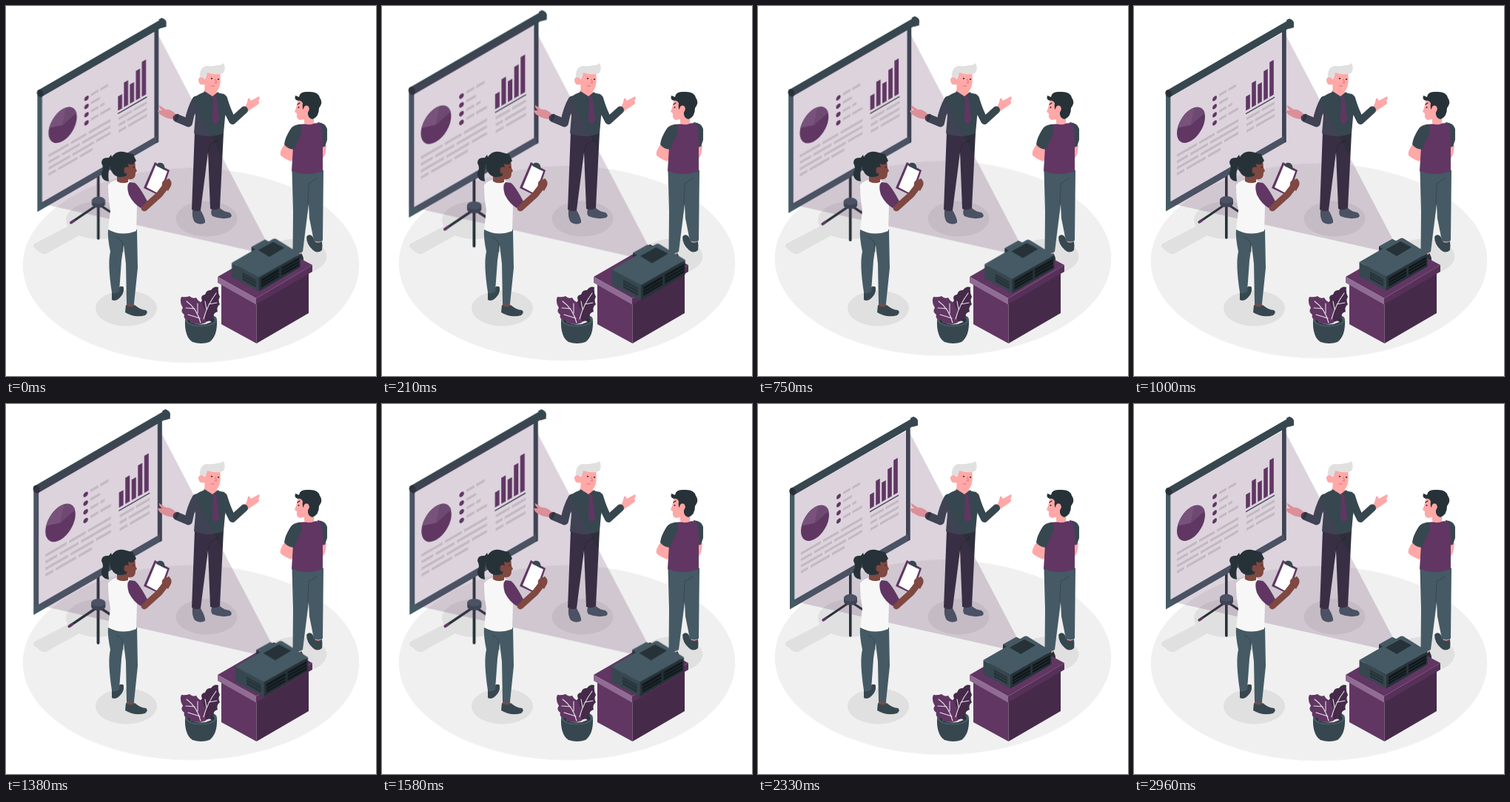
Write an HTML page that moves like this. It is 500x500 px and loops after 3040 ms.

```html
<!DOCTYPE html>
<html lang="en">
<head>
<meta charset="utf-8">
<title>Presentation</title>
<style>
html, body { margin: 0; width: 100%; height: 100%; overflow: hidden; background: #fff; }
svg { display: block; width: 100%; height: 100%; }
.beat { animation: beat 3040ms linear -20ms infinite; }
.float { animation: float 3040ms linear -20ms infinite; }
.screen { transform-origin: 129.5px 166px; }
.light { transform-origin: 225px 214px; }
@keyframes beat {
  0%, 29.6%, 39.47%, 59.21%, 100% { transform: scale(1); }
  9.87%, 49.34% { transform: scale(1.1); }
}
@keyframes float {
  0%, 49.34%, 98.68%, 100% { transform: translateY(0); }
  24.67%, 74.01% { transform: translateY(-10px); }
}
.ink { fill: #263238; }
.slate { fill: #37474f; }
.steel { fill: #455a64; }
.plum { fill: #613663; }
.night { fill: #452a49; }
.skin { fill: #ffa8a7; }
.brown { fill: #7f4841; }
.line { fill: none; stroke-linecap: round; stroke-linejoin: round; }
</style>
</head>
<body>
<svg viewBox="0 0 500 500">
  <!-- floor and shadows -->
  <ellipse class="float" cx="250" cy="350.8" rx="227.3" ry="131.7" fill="#f0f0f0"/>
  <g fill="#e0e0e0">
    <ellipse cx="124" cy="289.5" rx="43" ry="25.5"/>
    <ellipse cx="271" cy="287.5" rx="41.5" ry="24"/>
    <ellipse cx="162.5" cy="408.5" rx="41.5" ry="24"/>
    <ellipse cx="392" cy="338.5" rx="41.5" ry="24"/>
    <path d="M37 326V322L110 284L133 291L54 335Q50 336 46 333Z"/>
  </g>

  <!-- screen on its tripod -->
  <g class="beat screen">
    <path class="line" d="M125 267L88 292M125 267L160 290" stroke="#263238" stroke-width="3.2"/>
    <path class="line" d="M92 289.3L88.5 291.8" stroke="#613663" stroke-width="3.4"/>
    <path class="line" d="M124.8 226V313" stroke="#263238" stroke-width="3.6"/>
    <path class="slate" d="M116 262V267A9 5 0 0 0 134 267V262Z"/>
    <ellipse class="steel" cx="125" cy="262" rx="9" ry="5"/>
    <g transform="translate(43 118) skewY(-30)">
      <path class="steel" d="M0 0H162.5V159.5H0Z"/>
      <path class="slate" d="M157 0H162.5V159.5H160V150H157Z"/>
      <path fill="#fff" d="M6.500 0H157V150H6.500Z"/>
      <ellipse class="plum" cx="34" cy="62.5" rx="19" ry="21.5"/>
      <path d="M34 62.5L16 56A19 21.5 0 0 1 39 41.7Z" fill="#7f5a82"/>
      <path d="M34 62.5L39 41.7A19 21.5 0 0 1 52.5 57Z" fill="#725077"/>
      <path class="line" d="M66 45V79" stroke="#613663" stroke-width="6" stroke-dasharray="0 11"/>
      <g fill="none" stroke="#dedede" stroke-width="3.5">
        <path d="M72 44H82M84.5 44H95M72 55H84M72 66H82M84.5 66H90M72 77H82M84.5 77H98"/>
        <path d="M15 93H42M45 93H66M69 93H98M15 101.5H30M33 101.5H57M60 101.5H98M15 110H44M47 110H76M79 110H98M15 118H25M28 118H54M57 118H74"/>
        <path d="M109 97.5H127M129.5 97.5H147M109 106H118M120.5 106H147M109 114.5H119M122 114.5H147"/>
      </g>
      <path d="M111 86V67M119 86V53M127 86V60M135 86V46.5M143 86V39" stroke="#613663" stroke-width="5.6"/>
      <path d="M108 90H147" stroke="#37474f" stroke-width="1.5"/>
    </g>
    <path class="line" d="M47.5 118L211 23.5" stroke="#37474f" stroke-width="10"/>
    <path class="slate" d="M206 19L210 17Q216 19 216 24V29L209 31Z"/>
    <ellipse class="ink" cx="46.8" cy="118.3" rx="4" ry="5.3" transform="rotate(-25 46.8 118.3)"/>
  </g>

  <!-- presenter -->
  <g>
    <path class="steel" d="M252 276Q251 286 255 292Q262 297 269 293Q270 288 263 276ZM278 274Q276 281 279 284Q291 289 303 286Q307 283 302 279Q294 278 289 273Z"/>
    <path d="M255 170L251 275Q257 279 263 276L273 198L276 274Q283 277 289 273L294 171Z" fill="#2f2e3b"/>
    <path d="M273 198L276 187L286 181" class="line" stroke="#23222d" stroke-width="1"/>
    <path class="skin" d="M231 147L226 143Q220 139 216 140L207 134Q206 137 211 141L205 141Q207 147 211 148Q217 153 229 153Z"/>
    <path class="skin" d="M322 139L326 130Q327 123 329 125L331 128L342 122Q344 124 341 128Q344 131 339 134Q333 138 326 143Z"/>
    <path class="line" d="M257 127Q250 139 246.5 158L231 151.5" stroke="#37474f" stroke-width="11"/>
    <path class="line" d="M232 147.5L229.5 153.5" stroke="#263238" stroke-width="3.5"/>
    <path class="line" d="M294 125Q299 142 306 155L322 140.5" stroke="#37474f" stroke-width="10"/>
    <path class="slate" d="M269 116Q259 119 255 124Q251 133 256 148L254 172Q274 180 294 172L296 150Q302 128 295 119L284 117Z"/>
    <path class="skin" d="M269 104H285V117L280 123L268 117Z"/>
    <path d="M268 115L279 122L287 116L289 121L282 126L279 122L275 128L266 119Z" class="slate"/>
    <path class="plum" d="M279 122L283 122L285 127L288 154L284 160L279 155L280 127Z"/>
    <path class="skin" d="M267 88L289 88Q292 112 283 116Q273 117 268 106Q260 108 260 99Q262 94 267 97Z"/>
    <path d="M262 97Q261 83 271 81Q280 82 285 80Q292 80 294 77Q298 86 293 91Q283 94 272 90Q270 100 268 99Q264 93 262 97Z" fill="#e0e0e0"/>
    <circle class="ink" cx="278" cy="98" r="1.1"/><circle class="ink" cx="287" cy="99" r="1.1"/>
    <path class="line" d="M283 99L284.5 104H282M277 107.5Q279 109.500 281.500 108" stroke="#d9736f" stroke-width="1"/>
  </g>

  <!-- beam -->
  <g class="beat light" fill="#613663" fill-opacity=".22">
    <path d="M50 121L203 35L361 337Z"/>
    <path d="M50 121L361 337L50 267Z"/>
  </g>

  <!-- listener on the right -->
  <g>
    <path class="skin" d="M388 329H400V341Q395 345 389 340ZM416 313H427V323H416Z"/>
    <path class="ink" d="M389 337Q394 341 399 334Q404 342 401 347L390 348Z"/>
    <path class="slate" d="M406 312Q409 307 414 311L418 319Q423 321 427 318Q428 324 427 330Q421 335 415 330Q406 322 406 312Z"/>
    <path class="steel" d="M386.500 222L388 278L387.500 333Q394 336 401 332L409 268L410 287L416 317Q422 320 428 317L429 222Z"/>
    <path class="line" d="M408 267L409 240L420 233" stroke="#37474f" stroke-width="1"/>
    <path class="skin" d="M377 186Q369 197 371 202Q377 207 386 210L391 196L387 188ZM427 186L433 188Q432 201 429 205H426Z"/>
    <path class="slate" d="M421 157Q432 158 434 166V181L431 190L426 191Z"/>
    <path class="plum" d="M395 160Q387 169 388 190L386 223Q408 231 428 223L428 188Q429 166 424 158Z"/>
    <path class="slate" d="M398 160Q388 160 384 167Q377 178 376 187Q380 193 389 194Q394 182 399 173Q401 163 398 160Z"/>
    <path class="skin" d="M395 125L392 138L390 143L393 145Q392 153 397 154L403 153V158Q407 162 416 159L417 136Z"/>
    <path class="ink" d="M395 128Q389 127 391 121L396 123Q397 115 408 116Q422 115 424 124Q429 130 423 138Q423 150 414 153Q407 151 408 143Q411 136 405 135L402 140Q400 138 401 131Q398 127 395 128Z"/>
    <ellipse class="skin" cx="406" cy="139" rx="3.8" ry="4.5"/>
    <path class="line" d="M394 133L397 131" stroke="#263238" stroke-width="1.3"/>
    <circle class="ink" cx="395.5" cy="137" r="1"/>
  </g>

  <!-- listener on the left -->
  <g>
    <path class="brown" d="M143 382H153V394H143ZM163 398H173V410H163Z"/>
    <path class="slate" d="M143 387Q147 391 151 384Q154 376 159 380Q160 388 154 394Q148 400 143 397ZM162 404Q169 409 174 404Q182 411 189 411Q193 414 188 418Q174 422 161 414Z"/>
    <path class="steel" d="M138 302Q137 313 141 332Q137 348 143 387Q148 390 153 386L156 344L159 323L162 348L163 402Q168 405 173 402L178 354L177 302Z"/>
    <path class="line" d="M158 332L157 318L149 312" stroke="#37474f" stroke-width="1"/>
    <path d="M151 235Q142 236 138 242Q138 260 141 276L138 302Q156 312 176 304L177 270L174 240L164 235Z" fill="#f7f7f7"/>
    <path class="plum" d="M186 246L201 211L221 222L209 257Z"/>
    <path fill="#fff" d="M190 245L202.5 215L218 223.5L207 254Z"/>
    <path class="slate" d="M203 216L206 212Q212 211 214 216L215 222Z"/>
    <path class="line" d="M187 273L207 255L217 242" stroke="#7f4841" stroke-width="9"/>
    <path class="brown" d="M211 244Q210 236 214 236L220 233Q225 237 223 243L219 250Z"/>
    <path class="plum" d="M167 238Q162 242 166 255Q172 267 182 273L191 264Q180 243 174 239Z"/>
    <path class="brown" d="M150 227H165V238Q157 241 150 237Z"/>
    <path class="brown" d="M160 209L174 207L175 219L177 223L175 225Q175 233 170 234Q163 235 158 230Z"/>
    <path class="ink" d="M143 204Q149 195 159 197L170 200L171 199L176 209Q170 216 165 213L166 222L162 230Q148 234 143 224Q140 221 141 214Q137 226 139 237Q128 236 129 225Q133 220 129 212Q129 204 139 205L142 201Z"/>
    <ellipse class="brown" cx="163" cy="222" rx="3.5" ry="4.5"/>
    <path class="line" d="M170 214L173 213" stroke="#263238" stroke-width="1.2"/>
    <circle class="ink" cx="172.5" cy="218" r="1"/>
  </g>

  <!-- table -->
  <path class="plum" d="M291 374L338.5 400V456L291 430Z"/>
  <path class="night" d="M338.5 400L409 360V415L338.5 456Z"/>
  <path class="plum" d="M286 366L362 322L414 350L338 395Z"/>
  <path fill="#906b93" d="M286 366L338 395V403.5L286 374Z"/>
  <path fill="#573059" d="M338 395L414 350V359L338 403.5Z"/>

  <!-- projector -->
  <g class="beat light">
    <path class="ink" d="M331 325L349 315L355 318V326L334 336L331 333Z"/>
    <path class="steel" d="M331 325L349 315L354 317.5L336 328Z"/>
    <path class="slate" d="M304.5 346L341 365V384.5L304.5 365Z"/>
    <path class="ink" d="M341 365L396.5 334V352L341 384.5Z"/>
    <path class="steel" d="M304.5 346L360 314Q362 313 364 314L396.5 334L341 365.5Z"/>
    <path class="ink" d="M340 329L360 318L375 326L355 338Z"/>
    <path class="ink" d="M319 359L337 369V379L319 369Z"/>
    <path class="line" d="M320 362L336 371M320 366L336 375" stroke="#37474f" stroke-width="1"/>
    <path d="M344 368L368 354V365L344 379ZM371 352.5L395 339V350L371 363.5Z" fill="#10181c"/>
    <path d="M344 372L368 358M344 376L368 362M371 356L395 342.5M371 360L395 346.5" stroke="#263238" stroke-width="1"/>
  </g>

  <!-- plant -->
  <g>
    <path class="slate" d="M242 424Q241 447 252 454Q264 458 275 454Q286 446 285 424Z"/>
    <ellipse class="steel" cx="263.5" cy="424" rx="21.5" ry="9.5"/>
    <ellipse class="ink" cx="263.5" cy="424.5" rx="18" ry="7"/>
    <path fill="#e6e0e6" d="M249 427Q264 419 278 427Q264 434 249 427Z"/>
    <path class="night" d="M264 427Q259 415 264 410Q260 402 265 398Q262 391 269 390Q271 383 277 384Q281 378 287 380Q286 388 289 393Q286 398 289 403Q284 407 286 413Q279 415 281 421Q274 428 264 427Z"/>
    <path class="plum" d="M263 430Q250 430 247 424Q239 424 241 417Q235 413 239 408Q234 400 237 393Q244 394 248 392Q252 396 257 394Q260 400 266 401Q265 407 270 410Q268 421 270 428Z"/>
    <path class="line" d="M263 428Q258 409 244 399M259 415V402M255 409L243 408M262 422L246 417M267 423Q272 404 284 388M271 410L269 399M274 403L285 401" stroke="#eadfeb" stroke-width="1.1"/>
  </g>
</svg>
</body>
</html>
```
